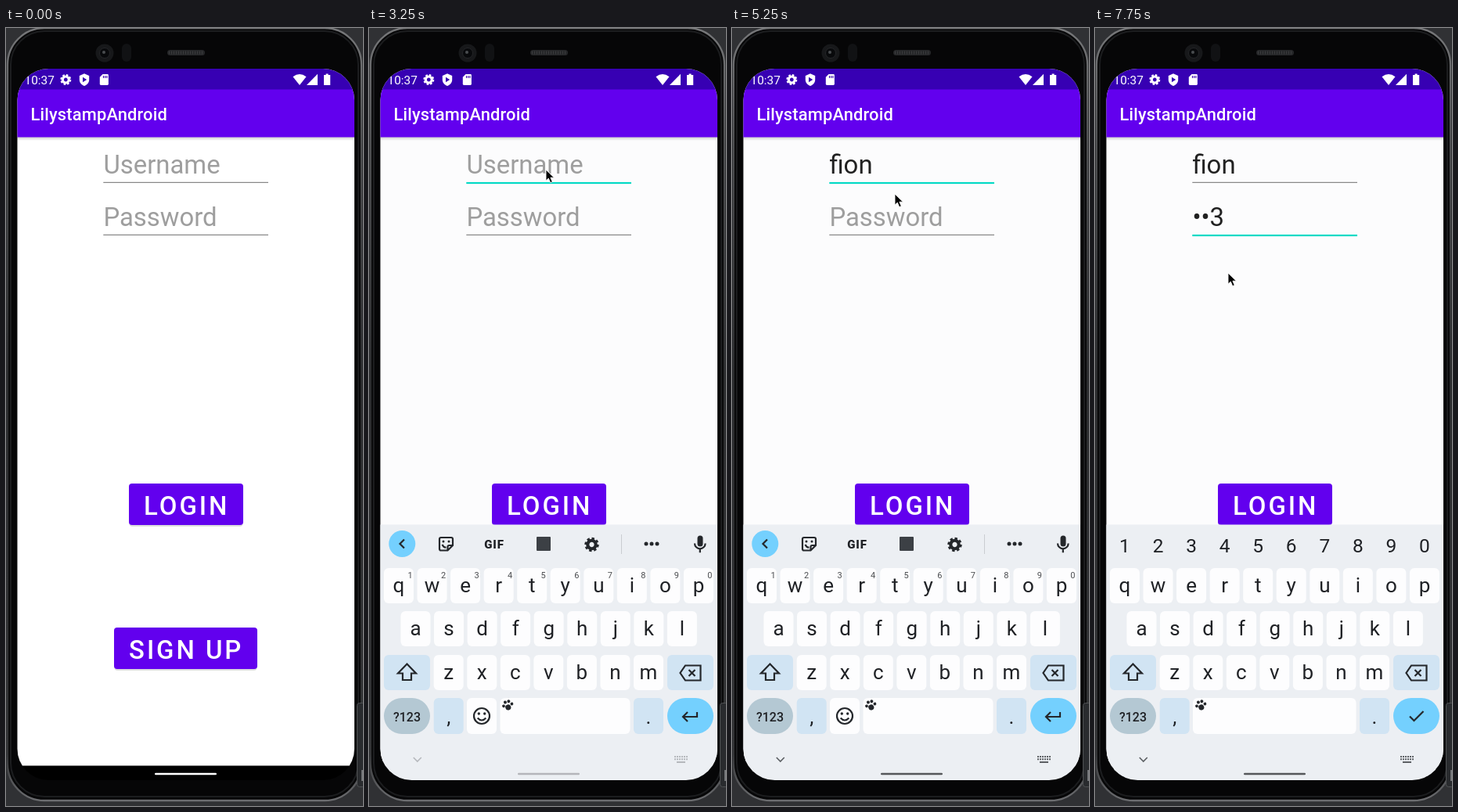
Animation of 456 by 994 pixels, one loop 8000 ms. Source, as an HTML page:

```html
<!DOCTYPE html>
<html lang="en">
<head>
<meta charset="utf-8">
<title>Login form</title>
<style>
html, body { margin: 0; height: 100%; overflow: hidden; background: #303134; }
svg { display: block; width: 100vw; height: 100vh; }
text { font-family: Roboto, "Open Sans", sans-serif; }
.field { font-size: 32.9px; fill: #212121; }
.field.hint { fill: #9e9e9e; }
.button { font-size: 32.9px; font-weight: 500; letter-spacing: 2.94px; fill: #fff; }
.key { font-size: 26px; fill: #1f2125; text-anchor: middle; }
.num { font-size: 24.5px; }
.sup { font-size: 11px; fill: #4b4d50; }
.line { fill: none; stroke: #24272b; stroke-width: 2.2; }
</style>
</head>
<body>
<svg viewBox="0 0 456 994">
  <defs>
    <clipPath id="screen"><rect x="14.5" y="52" width="430.5" height="909" rx="40"/></clipPath>
    <linearGradient id="rim" x2="0" y2="1">
      <stop stop-color="#77787a"/><stop offset=".15" stop-color="#505153"/>
      <stop offset=".45" stop-color="#2c2d2f"/><stop offset=".94" stop-color="#343537"/>
      <stop offset="1" stop-color="#6c6d70"/>
    </linearGradient>
    <linearGradient id="shade" x2="0" y2="1">
      <stop stop-color="#000" stop-opacity=".2"/><stop offset="1" stop-color="#000" stop-opacity="0"/>
    </linearGradient>
  </defs>

  <!-- phone body -->
  <rect width="456" height="994" fill="#303134"/>
  <rect x="2" y="0" width="452" height="987" rx="47" fill="#070708" stroke="url(#rim)" stroke-width="2.4"/>
  <rect x="6" y="4" width="444" height="978" rx="43" fill="#060607" stroke="#1c1d1f" stroke-width="2"/>
  <rect x="448.5" y="862.5" width="10" height="107" rx="3" fill="#292b2e" stroke="#505254"/>
  <rect x="454" y="948" width="2" height="14" fill="#77797c"/>
  <circle cx="126" cy="32" r="11.5" fill="#17181a"/>
  <circle cx="126" cy="32" r="6.5" fill="#08090b" stroke="#242528"/>
  <circle cx="125" cy="31" r="2" fill="#4a4d50"/>
  <rect x="148" y="20" width="12" height="23" rx="6" fill="#111214"/>
  <rect x="206" y="28" width="48" height="7" rx="3.5" fill="#262729"/>
  <path d="M208 31.5h44" stroke="#3a3b3d" stroke-width="4" stroke-dasharray="1 2"/>

  <g clip-path="url(#screen)">
    <rect id="page" x="14" y="52" width="432" height="891"/>
    <rect x="14" y="942.5" width="432" height="19" fill="#000"/>
    <rect x="14" y="139" width="432" height="5" fill="url(#shade)"/>
    <rect x="14" y="52" width="432" height="27" fill="#3700b3"/>
    <rect x="14" y="78.5" width="432" height="61" fill="#6200ee"/>
    <text x="23.5" y="72" font-size="15.4" fill="#fff">10:37</text>
    <g id="status" fill="#fff">
      <path d="M100 58.3l6.2 2.6v5c0 4-2.8 6.7-6.2 8.1c-3.4-1.4-6.2-4.1-6.2-8.1v-5z"/>
      <path d="M98 62.7l5.2 3.3l-5.2 3.3z" fill="#3700b3"/>
      <path d="M123.5 59h6a1.4 1.4 0 0 1 1.4 1.4v11.2a1.4 1.4 0 0 1-1.4 1.4h-8.3a1.4 1.4 0 0 1-1.4-1.4v-8.9z"/>
      <path d="M124.5 61v3m2.2-3v3m2.2-3v3" stroke="#3700b3" stroke-width="1.1"/>
      <path d="M366.5 62.3q8.5-6.6 17 0L375 73z"/>
      <path d="M398 58.7V73h-14z"/>
      <path d="M406 60h2.6v-1.6h3V60h2.6v13H406z"/>
    </g>
    <text x="31.5" y="118" font-size="21.9" font-weight="500" letter-spacing=".16" fill="#fff">LilystampAndroid</text>

    <text id="user" class="field" x="124.4" y="185.8"></text>
    <text id="pass" class="field" x="124.4" y="252.8"></text>
    <rect id="userLine" x="124.3" width="210.7"/>
    <rect id="passLine" x="124.3" width="210.7"/>
    <rect id="caret" width="2.4" height="45" fill="#03dac5"/>
    <g id="buttons"></g>

    <g id="board">
      <rect x="14" y="634.5" width="432" height="340" fill="#eceff3"/>
      <g id="keys"></g>
      <g id="textKeys"></g>
      <g id="passKeys"></g>
      <g id="nav">
        <path d="M56.8 932l5 5l5-5" class="line" style="stroke:#5c5f63;stroke-width:1.6"/>
        <path d="M390 931h17m-17 3.2h17" stroke="#5c5f63" stroke-width="2" stroke-dasharray="2 1"/>
        <path d="M393 938h11" stroke="#5c5f63" stroke-width="2"/>
      </g>
    </g>
    <rect id="pill" x="190" y="951.7" width="79" height="2.6" rx="1.3"/>
  </g>
  <path id="mouse" d="M0 0v14.2l3.3-3.1l2.4 5.6l2.6-1.1l-2.4-5.4h4.6z" fill="#000" stroke="#fff" stroke-width=".9"/>
</svg>
<script>
const $ = id => document.getElementById(id);
const add = (id, markup) => $(id).insertAdjacentHTML('beforeend', markup);
const show = (id, on) => $(id).style.display = on ? '' : 'none';
const set = (id, attrs) => { for (const k in attrs) $(id).setAttribute(k, attrs[k]); };

const PITCH = 42.55, WHITE = '#fdfdfe', BLUE = '#d1e4f3', SKY = '#74d0fe', INK = '#24272b';
const box = (x, y, w, h, r, fill) => `<rect x="${x}" y="${y}" width="${w}" height="${h}" rx="${r}" fill="${fill}"/>`;
const label = (x, y, s, cls = '') => `<text x="${x}" y="${y}" class="key ${cls}">${s}</text>`;
const line = d => `<path class="line" d="${d}"/>`;
const dot = (x, y, r, fill = INK) => `<circle cx="${x}" cy="${y}" r="${r}" fill="${fill}"/>`;
const gear = (x, y, s, color) => `<g transform="translate(${x} ${y}) scale(${s})" fill="none" stroke="${color}">
  <circle r="5.5" stroke-width="4.4"/><circle r="8.2" stroke-width="3" pathLength="16" stroke-dasharray="1.1 .9"/></g>`;
const paw = x => `<g transform="translate(${x} 865) rotate(-15)">` + dot(0, 3, 3.6) + dot(-5.2, 0, 1.9) +
  dot(-2, -4.2, 2) + dot(2.6, -4.2, 2) + dot(5.6, 0, 1.9) + '</g>';

function button(x, y, w, s) {
  add('buttons', box(x + .5, y + 2, w - 1, 53, 4, '#0002') + box(x, y, w, 53, 4, '#6200ee') +
    `<text class="button" x="${x + 19.1}" y="${y + 40}">${s}</text>`);
}
button(157, 582, 146, 'LOGIN');
button(138, 766, 183, 'SIGN UP');
add('status', gear(76.3, 66, .72, '#fff'));

// Letters
[['qwertyuiop', 19, 690, 721], ['asdfghjkl', 40.5, 745, 776], ['zxcvbnm', 82.7, 801, 832]].forEach(([row, x, y, base]) =>
  [...row].forEach((c, i) => {
    const left = x + i * PITCH;
    add('keys', box(left, y, 38, 45, 6, WHITE) + label(left + 19, base, c));
  }));
[...'1234567890'].forEach((n, i) => {
  add('textKeys', label(52.5 + i * PITCH, 702.5, n, 'sup'));
  add('passKeys', label(38 + i * PITCH, 669.5, n, 'num'));
});

// Function keys
add('keys', box(19, 801, 59, 45, 6, BLUE) + box(381, 801, 59, 45, 6, BLUE) +
  box(19, 856, 59, 46, 23, '#b4c8d3') + box(82.7, 856, 38, 46, 6, BLUE) +
  box(338, 856, 38, 46, 6, BLUE) + box(381, 856, 59, 46, 23, SKY) +
  line('M48.5 812.5L60 824.5H54V833H43V824.5H37z') +
  line('M404 814.5H423.5V833.5H404L397.5 824zM408.5 820l8 8m0-8l-8 8') +
  `<text x="48.5" y="885.5" class="key" style="font-size:16px;font-weight:500">?123</text>` +
  label(101.7, 889, ',') + label(357, 889, '.'));

add('textKeys', box(125, 856, 38, 46, 6, WHITE) + box(167.5, 856, 166, 46, 6, WHITE) + paw(177) +
  `<circle class="line" cx="144" cy="879" r="10"/>` + dot(140.3, 876, 1.7) + dot(147.7, 876, 1.7) +
  line('M138.7 881.5q5.3 6 10.6 0') +
  line('M419 874v6H401m6-6l-6 6l6 6') +
  dot(42.3, 659, 17, SKY) + line('M45 653.5l-5.5 5.5l5.5 5.5') +
  line('M92 651h13a2 2 0 0 1 2 2v8l-6.5 6.5H92a2 2 0 0 1-2-2V653a2 2 0 0 1 2-2zM107 661h-4.5a2 2 0 0 0-2 2v4.5M93.5 660q2 4 5 3.5') +
  dot(95, 656, 1.5) + dot(102, 656, 1.5) +
  `<text x="160" y="664.5" class="key" style="font-size:15px;font-weight:900;letter-spacing:.8px">GIF</text>` +
  box(214, 650, 18, 18, 1, '#3c4045') + gear(284.5, 660, .95, INK) +
  box(322, 647, 1, 25, 0, '#c9ccd0') + dot(354, 659, 2.5) + dot(361, 659, 2.5) + dot(368, 659, 2.5) +
  box(419.5, 648.5, 7, 14, 3.5, INK) + line('M416 658.5a6.8 6.8 0 0 0 13.6 0M422.8 665.3v5'));

add('passKeys', box(125, 856, 208.5, 46, 6, WHITE) + paw(135) + line('M402 879.5l5.5 5.5l12-12'));

// Timelines of [start, value]
const mousePath = [[750, [243, 226]], [1000, [227, 185]], [1250, [226, 181]],
  [5250, [208, 212]], [5500, [181.5, 247]], [7750, [170, 313]]];
const userText = [[3500, 'fi'], [4500, 'fio'], [4750, 'fion']];
const passText = [[6750, '1'], [7000, '••3']];
const caretFlips = [1500, 2000, 2500, 3000, 3500, 4000, 4500, 5250, 5750, 6250, 6750, 7500];
const at = (list, t) => list.filter(e => e[0] <= t).pop()?.[1];

function field(id, value, hint, y, focused) {
  $(id).textContent = value || hint;
  $(id).classList.toggle('hint', !value);
  set(id + 'Line', focused ? { y, height: 2.2, fill: '#03dac5' } : { y: y - .1, height: 1.1, fill: '#7b7b7b' });
  if (focused) set('caret', { x: 124.2 + (value ? $(id).getComputedTextLength() : 0), y: y - 46.8 });
}

function draw(now) {
  const t = Math.floor(now % 8000 / 250) * 250;
  const open = t >= 2500, secret = t >= 6000;
  field('user', at(userText, t), 'Username', 196.9, t >= 1500 && t < 5750);
  field('pass', at(passText, t), 'Password', 263.9, t >= 5750);
  show('caret', caretFlips.filter(f => f <= t).length % 2);

  const pos = at(mousePath, t);
  show('mouse', pos);
  if (pos) set('mouse', { transform: `translate(${pos})` });

  set('page', { fill: open ? '#fcfcfd' : '#fff' });
  show('board', open);
  show('textKeys', !secret);
  show('passKeys', secret);
  set('board', { transform: `translate(0 ${t < 2750 ? 2 : 0})` });
  const fade = Math.min(1, Math.max(0, (t - 2500) / 2000));
  set('nav', { opacity: fade });
  set('pill', { fill: open ? '#55575a' : '#fff', opacity: open ? fade : 1 });
}

const start = performance.now();
function tick(now) {
  draw(Math.max(0, now - start));
  requestAnimationFrame(tick);
}
requestAnimationFrame(tick);
</script>
</body>
</html>
```
